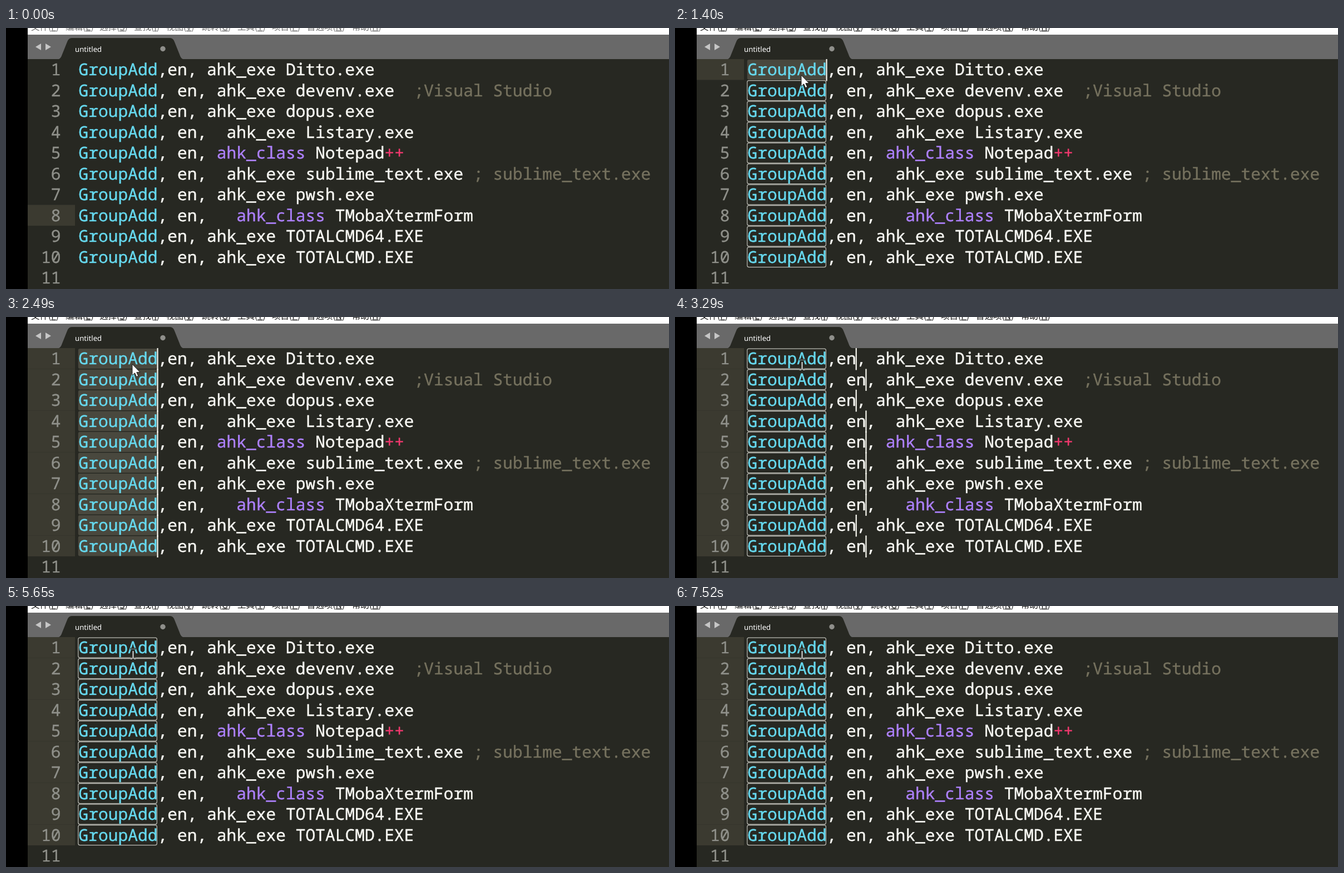
These frames come from a looping animation (1192 px wide and 470 px high, 8 s). An HTML page:

```html
<!DOCTYPE html>
<html lang="zh-CN">
<head>
<meta charset="utf-8">
<title>Multi-cursor editing</title>
<style>
  html, body { margin: 0; width: 100%; height: 100%; overflow: hidden; background: #272822; }
  svg { display: block; width: 1192px; height: 470px; }
  text { white-space: pre; text-rendering: geometricPrecision; }
  .code { font: 29.57px "Noto Sans Mono", "DejaVu Sans Mono", monospace; fill: #fafaf5; stroke: #fafaf5; stroke-width: .4px; }
  .menu { font: 15.5px "Noto Sans CJK SC", "Noto Sans CJK", sans-serif; }
  .tab { font: 13.2px "Noto Sans", "Open Sans", sans-serif; fill: #fff; }
  .cmd { fill: #66d9ef; stroke: #66d9ef; }
  .key { fill: #ae81ff; stroke: #ae81ff; }
  .op { fill: #f0386e; stroke: #f0386e; }
  .note { fill: #75715e; stroke: #75715e; }
  .num { fill: #8f908a; stroke: #8f908a; text-anchor: end; }
</style>
</head>
<body>
<svg id="stage" viewBox="0 0 1192 470">
  <rect width="1192" height="470" fill="#272822"/>
  <rect width="1192" height="12" fill="#fff"/>
  <rect y="12" width="1192" height="44" fill="#696969"/>
  <path d="M95 56C99 54 100 50 102 45L110 25Q112.500 18 118 18H295Q300.500 18 303 25L311 45C313 50 314 54 318 56Z" fill="#272822"/>
  <path d="M63 28V40L53 34ZM71 28V40L81 34Z" fill="#c6c6c6"/>
  <text class="tab" x="124" y="43">untitled</text>
  <circle cx="282" cy="37.5" r="4.7" fill="#8f8f8b"/>
  <g id="menu" class="menu"></g>
  <rect width="39" height="470" fill="#000"/>
  <g id="rows"></g>
  <path id="arrow" d="M0 0V20L4.6 15.8L7.6 22.6L10.8 21.2L7.8 14.6H14Z" fill="#fff" stroke="#111" stroke-width=".9"/>
  <g id="beam" fill="none">
    <path d="M-5 -9H-1.500L0 -8L1.500 -9H5M0 -8V9M-5 9H5" stroke="#272822" stroke-width="3.200"/>
    <path d="M-4 -9H-1.500L0 -8L1.500 -9H4" stroke="#8a9a9c" stroke-width="1"/>
    <path d="M0 -5V9M-5 9H-1.500M1.500 9H5" stroke="#f4f4f4" stroke-width="1.700"/>
  </g>
</svg>
<script>
const LOOP = 8000, LEFT = 130.5, CHAR = 17.74, TOP = 56, PITCH = 37.5;
const $ = id => document.getElementById(id);

function add(parent, tag, attrs, text) {
  const node = document.createElementNS('http://www.w3.org/2000/svg', tag);
  for (const k in attrs) node.setAttribute(k, attrs[k]);
  if (text !== undefined) node.textContent = text;
  parent.appendChild(node);
  return node;
}

const menus = [
  [45, '文件', 'F'], [107, '编辑', 'E'], [168, '选择', 'S'], [230, '查找', 'I'], [288, '视图', 'V'],
  [352, '跳转', 'G'], [416, '工具', 'T'], [478, '项目', 'P'], [541, '首选项', 'N'], [622, '帮助', 'H']
];
for (const [x, name, key] of menus) {
  const label = add($('menu'), 'text', { x, y: 3.6 });
  add(label, 'tspan', {}, name + '(');
  add(label, 'tspan', { 'text-decoration': 'underline' }, key);
  add(label, 'tspan', {}, ')');
}

// Each line: has a space after the comma, then [text, class] parts after "en,"
const lines = [
  [false, [' ahk_exe Ditto.exe']],
  [true, [' ahk_exe devenv.exe  '], [';Visual Studio', 'note']],
  [false, [' ahk_exe dopus.exe']],
  [true, ['  ahk_exe Listary.exe']],
  [true, [' '], ['ahk_class', 'key'], [' Notepad'], ['++', 'op']],
  [true, ['  ahk_exe sublime_text.exe '], ['; sublime_text.exe', 'note']],
  [true, [' ahk_exe pwsh.exe']],
  [true, ['   '], ['ahk_class', 'key'], [' TMobaXtermForm']],
  [false, [' ahk_exe TOTALCMD64.EXE']],
  [true, [' ahk_exe TOTALCMD.EXE']]
];

function gutter(i) {
  const y = TOP + i * PITCH, g = $('rows');
  const bar = add(g, 'rect', { x: 39, y, width: 85, height: PITCH, fill: '#3b3a30' });
  add(g, 'text', { class: 'code num', x: 98.6, y: y + 29.2 }, i + 1);
  return bar;
}

const rows = lines.map(([spaced, ...parts], i) => {
  const y = TOP + i * PITCH, g = $('rows');
  const bar = gutter(i);
  const box = add(g, 'rect', { x: 129.8, y: y + 1.1, width: 141.6, height: 36, rx: 3 });
  const text = add(g, 'text', { class: 'code', x: LEFT, y: y + 29.2 });
  add(text, 'tspan', { class: 'cmd' }, 'GroupAdd');
  const comma = add(text, 'tspan', {});
  add(text, 'tspan', {}, 'en,');
  for (const [s, cls = ''] of parts) add(text, 'tspan', { class: cls }, s);
  return { spaced, bar, box, comma };
});
gutter(lines.length).style.display = 'none';
rows.forEach((row, i) => {
  row.caret = add($('rows'), 'rect', { y: TOP + i * PITCH, width: 2.2, height: 39.5, fill: '#f8f8f0' });
});

// Only the changed values are listed at each step.
// from/to: active lines, mark: 0 none, 1 boxes, 2 selection
const steps = [
  [0, { from: 7, to: 7, mark: 0, caret: 0, col: 8, menu: '#6d6d6d', even: false, mouse: null }],
  [150, { mouse: ['arrow', 262, 20] }],
  [310, { mouse: ['beam', 238, 70] }],
  [460, { mouse: ['beam', 228.5, 86] }],
  [620, { menu: '#1a1a1a', from: 0, to: 0, caret: 1, col: 6 }],
  [780, { mark: 2, col: 8, mouse: ['arrow', 227, 85] }],
  [1090, { caret: .5 }],
  [1240, { caret: .1 }],
  [1400, { caret: 1 }],
  [1540, { to: 9 }],
  [2020, { caret: .5 }],
  [2190, { caret: 0 }],
  [2490, { caret: 1 }],
  [2820, { caret: .6 }],
  [2970, { caret: 1, mark: 1, mouse: ['beam', 228.5, 86] }],
  [3130, { col: 12 }],
  [3460, { caret: .6 }],
  [3610, { caret: .2 }],
  [3910, { caret: 1, col: 10 }],
  [4230, { caret: .75 }],
  [4390, { caret: .3 }],
  [4550, { caret: 0 }],
  [4870, { caret: .6 }],
  [5010, { caret: 1 }],
  [5330, { caret: .75 }],
  [5490, { caret: .3 }],
  [5650, { caret: 0 }],
  [5950, { caret: 1, even: true }],
  [6280, { caret: .75 }],
  [6440, { caret: .3 }],
  [6600, { caret: 0 }],
  [6900, { caret: .6 }],
  [7050, { caret: 1 }],
  [7210, { caret: .8 }],
  [7370, { caret: .35 }],
  [7520, { caret: 0 }]
];

function stateAt(t) {
  const s = {};
  for (const [at, change] of steps) if (at <= t) Object.assign(s, change);
  return s;
}

function draw(s) {
  $('menu').setAttribute('fill', s.menu);
  rows.forEach((row, i) => {
    const active = i >= s.from && i <= s.to;
    const spaced = row.spaced || s.even;
    const selected = active && s.mark === 2;
    const col = s.col > 8 && !spaced ? s.col - 1 : s.col;
    row.bar.style.display = active ? '' : 'none';
    row.box.style.display = s.mark ? '' : 'none';
    row.box.setAttribute('fill', selected ? '#49483e' : 'none');
    row.box.setAttribute('stroke', selected ? 'none' : '#bdbdb6');
    row.box.setAttribute('stroke-width', 1.2);
    row.comma.textContent = spaced ? ', ' : ',';
    row.caret.setAttribute('x', LEFT + col * CHAR - 1);
    row.caret.setAttribute('opacity', active ? s.caret : 0);
  });
  for (const id of ['arrow', 'beam']) {
    const shown = s.mouse && s.mouse[0] === id;
    $(id).style.display = shown ? '' : 'none';
    if (shown) $(id).setAttribute('transform', `translate(${s.mouse[1]} ${s.mouse[2]})`);
  }
}

const start = performance.now();
function tick() {
  draw(stateAt((performance.now() - start) % LOOP));
  requestAnimationFrame(tick);
}
tick();
</script>
</body>
</html>
```
